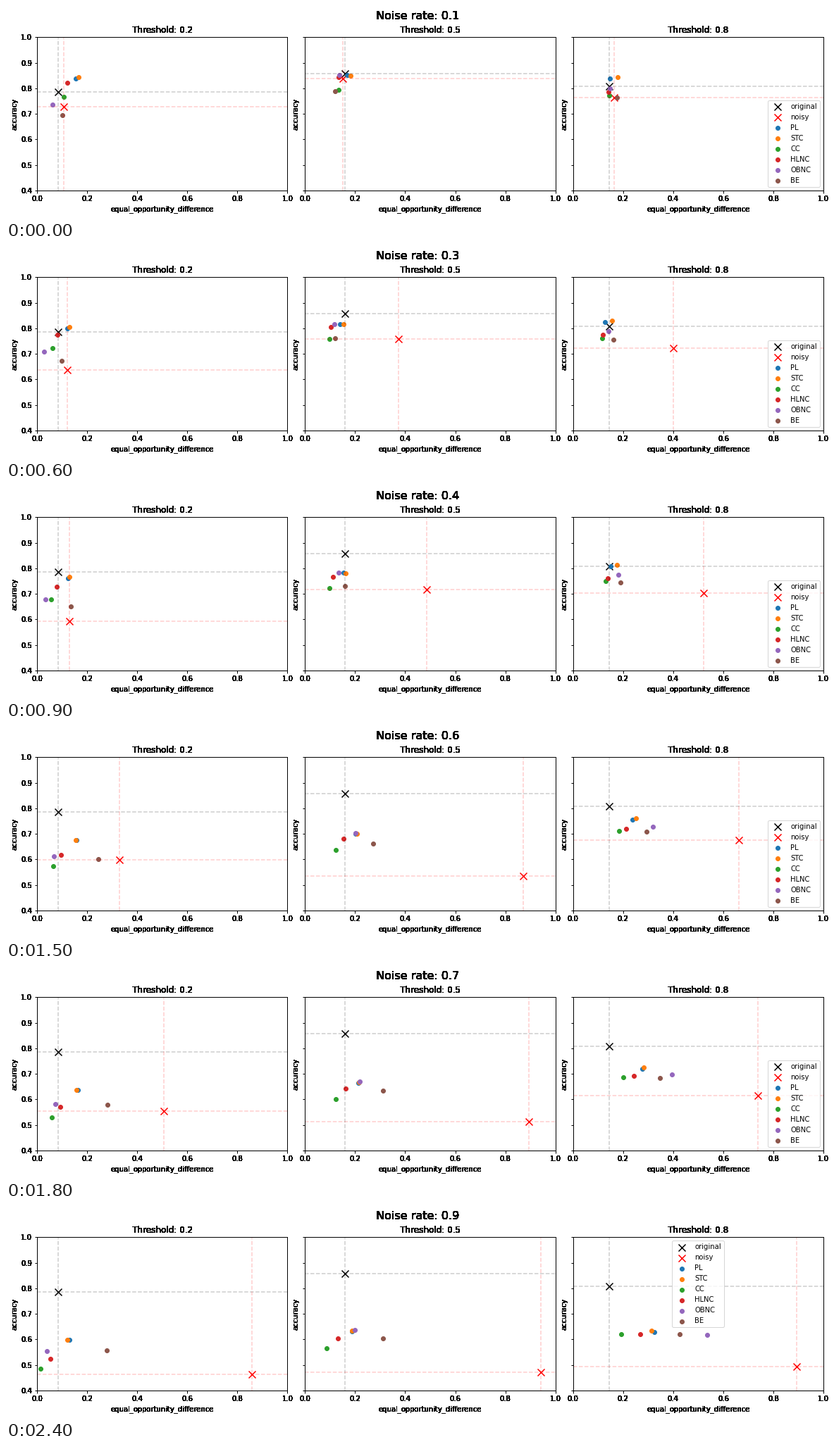
Animation, 1175 px wide and 301 px high, one loop 2.7 s. Source, as a matplotlib script:

```python
import numpy as np
import matplotlib.pyplot as plt
from matplotlib.animation import FuncAnimation

W, H, DPI = 1175, 301, 72
LEFT, TOP, AX_W, AX_H, PITCH = 44.0, 44.45, 355.41, 217.44, 380.29
plt.rcParams.update({
    "font.family": "DejaVu Sans", "font.size": 10, "axes.linewidth": 1,
    "xtick.major.width": 1, "ytick.major.width": 1,
})

SERIES = {
    "original": "black", "noisy": "red", "PL": "tab:blue", "STC": "tab:orange",
    "CC": "tab:green", "HLNC": "tab:red", "OBNC": "tab:purple", "BE": "tab:brown",
}
RATES = np.arange(1, 10) / 10
STOPS = [0.1, 0.4, 0.6, 0.9]


def smooth(t):
    return t * t * (3 - 2 * t)


# noisy: position at each of STOPS; start, end: where each method's dot travels
PANELS = [
    dict(threshold=0.2, base=(.084, .786), ease=smooth,
         noisy=[(.107, .728), (.129, .593), (.329, .599), (.858, .464)],
         start=[(.154, .838), (.165, .844), (.107, .767),
                (.121, .822), (.062, .736), (.101, .695)],
         end=[(.129, .599), (.121, .599), (.014, .485),
              (.053, .525), (.039, .554), (.279, .557)]),
    dict(threshold=0.5, base=(.159, .858), ease=smooth,
         noisy=[(.151, .838), (.486, .717), (.871, .535), (.942, .472)],
         start=[(.168, .852), (.182, .849), (.134, .793),
                (.134, .844), (.137, .851), (.120, .790)],
         end=[(.187, .631), (.187, .633), (.087, .566),
              (.132, .604), (.199, .636), (.312, .604)]),
    dict(threshold=0.8, base=(.1445, .808), ease=np.square,
         noisy=[(.163, .763), (.521, .703), (.662, .676), (.892, .494)],
         start=[(.147, .838), (.178, .844), (.144, .771),
                (.141, .785), (.147, .800), (.175, .764)],
         end=[(.325, .628), (.313, .633), (.192, .620),
              (.268, .620), (.536, .617), (.426, .620)]),
]


def heavy(text, passes=24):
    """Overprint a text so that its soft edges turn solid."""
    draw = text.draw

    def overprint(renderer):
        for _ in range(passes):
            draw(renderer)

    text.draw = overprint
    return text


def cross_lines(ax, x, y, color):
    style = dict(color=color, ls="--", alpha=0.2)
    return ax.axvline(x, **style), ax.axhline(y, **style)


def noisy_at(panel, rate):
    return [np.interp(rate, STOPS, values) for values in zip(*panel["noisy"])]


def dots_at(panel, rate):
    t = (rate - RATES[0]) / (RATES[-1] - RATES[0])
    start, end = np.array(panel["start"]), np.array(panel["end"])
    sway = -0.03 * np.sin(2 * np.pi * t)
    return start + (end - start) * panel["ease"](t) + [sway, 0]


def make_panel(index, panel):
    left, bottom = LEFT + PITCH * index, H - TOP - AX_H
    ax = fig.add_axes([left / W, bottom / H, AX_W / W, AX_H / H])
    ax.set(xlim=(0, 1), ylim=(0.4, 1), xticks=np.linspace(0, 1, 6),
           yticks=np.linspace(0.4, 1, 7))
    ax.tick_params(labelleft=index == 0)
    heavy(ax.set_title(f"Threshold: {panel['threshold']}"))
    heavy(ax.set_xlabel("equal_opportunity_difference"))
    heavy(ax.set_ylabel("accuracy"))
    for label in ax.get_xticklabels() + ax.get_yticklabels():
        heavy(label)

    base = panel["base"]
    marks = []
    for name, color in SERIES.items():
        look = dict(marker="x", s=100) if len(marks) < 2 else {}
        marks.append(ax.scatter(*base, color=color, label=name, **look))
    cross_lines(ax, *base, "black")
    return ax, marks[1:], cross_lines(ax, *base, "red")


fig = plt.figure(figsize=(W / DPI, H / DPI), dpi=DPI, facecolor="white")
title = heavy(fig.suptitle("", x=584.3 / W, y=1 - 7.2 / H, fontsize=16))
views = [make_panel(i, panel) for i, panel in enumerate(PANELS)]
legend = views[-1][0].legend(loc="lower right")


def update(i):
    rate = RATES[i]
    title.set_text(f"Noise rate: {rate:.1f}")
    for panel, (_, marks, (vline, hline)) in zip(PANELS, views):
        x, y = noisy_at(panel, rate)
        for mark, spot in zip(marks, [(x, y), *dots_at(panel, rate)]):
            mark.set_offsets([spot])
        vline.set_xdata([x, x])
        hline.set_ydata([y, y])
    legend.set_loc({7: "upper right", 8: "upper center"}.get(i, "lower right"))


anim = FuncAnimation(fig, update, frames=len(RATES), interval=300,
                     init_func=lambda: update(0), repeat=True, repeat_delay=0)
plt.show()
```
